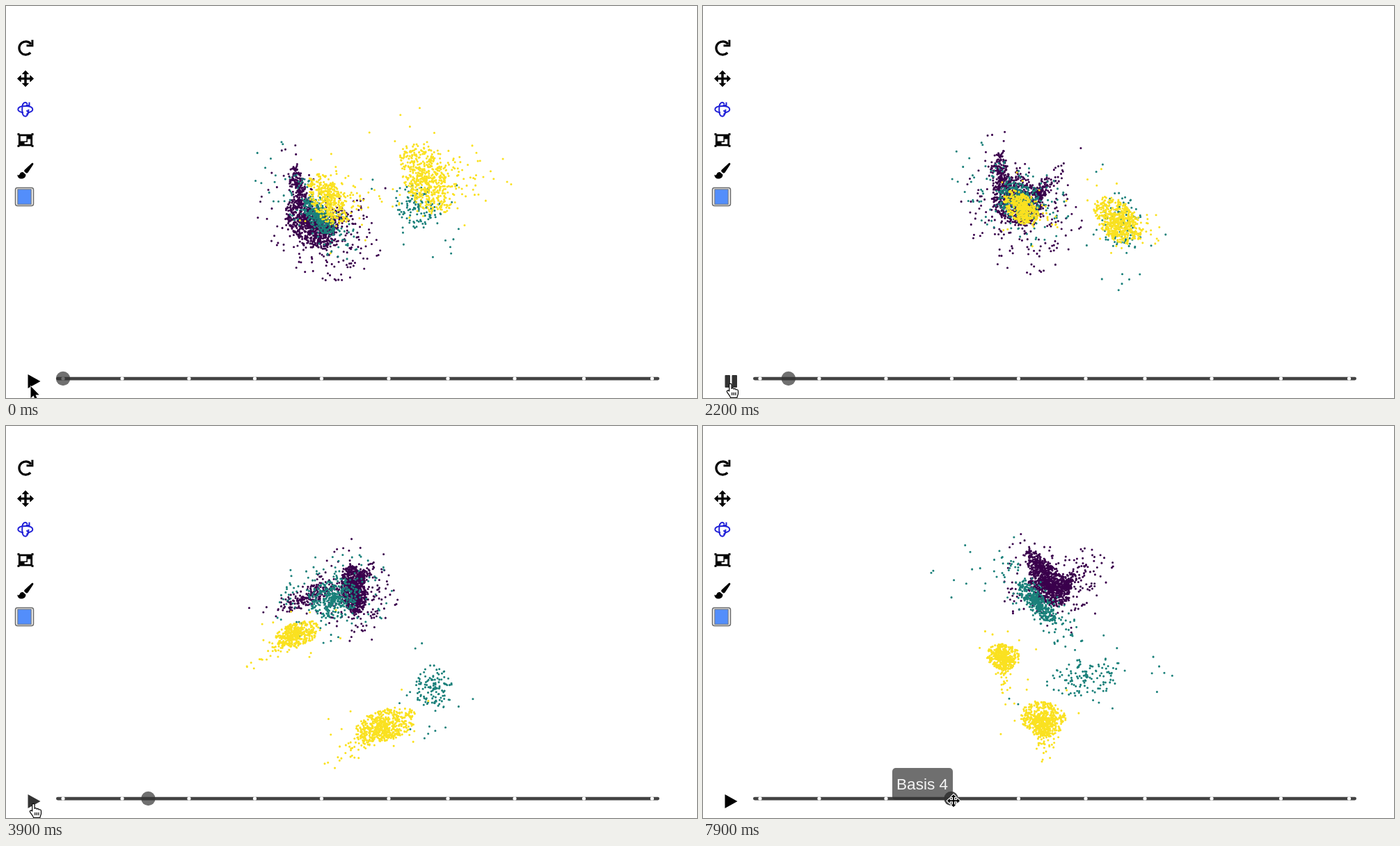
An HTML page with a canvas for the animation above (8000 ms loop, 993 by 564 pixels).

```html
<!DOCTYPE html>
<html lang="en">
<head>
<meta charset="utf-8">
<title>Projection player</title>
<style>
html, body { margin: 0; width: 100%; height: 100%; overflow: hidden; background: #fff; }
canvas, svg { position: absolute; left: 0; top: 0; width: 993px; height: 564px; display: block; }
text { font: 22.6px "Liberation Sans", Arial, sans-serif; }
</style>
</head>
<body>
<canvas id="plot" width="993" height="564"></canvas>
<svg viewBox="0 0 993 564">
  <defs>
    <path id="cross" d="M0-11.6L4.5-6.8H1.3V-1.3H6.8V-4.5L11.6 0L6.8 4.5V1.3H1.3V6.8H4.5L0 11.6L-4.5 6.8H-1.3V1.3H-6.8V4.5L-11.6 0L-6.8-4.5V-1.3H-1.3V-6.8H-4.5Z"/>
    <filter id="soft" x="-20%" y="-300%" width="140%" height="700%"><feGaussianBlur stdDeviation="2"/></filter>
  </defs>

  <path d="M35.2 67.2A9.5 9.5 0 1 1 36 54.8" fill="none" stroke="#000" stroke-width="3.2"/>
  <path d="M36.4 48.7H39.4V58.6H29.5V55.4L36.6 55.6Z"/>
  <use href="#cross" x="28" y="104.5" stroke="#000" stroke-width=".8" stroke-linejoin="round"/>
  <g fill="none" stroke="#2222d8" stroke-width="2">
    <path d="M25 153.4C19.5 152.6 17.3 151 17.3 148.8C17.3 145.6 22 144 27.8 144S38.3 145.6 38.3 148.8C38.3 151 36 152.6 31.5 153.3"/>
    <path d="M30.8 141.5C30 139.8 29 138.8 27.8 138.8C25 138.8 23.2 143 23.2 148.8S25 158.8 27.8 158.8C30.6 158.8 32.4 154.5 32.4 148.8"/>
    <path d="M33.5 138.5V143H28.6M29.5 150.3L32.8 153.3L29.5 156.3"/>
  </g>
  <path d="M16.5 183H19.4V184.4H36.6V183H39.5V185.9H38.1V200.1H39.5V203H36.6V201.6H19.4V203H16.5V200.1H17.9V185.9H16.5ZM20.8 187.3V194.5H29.4V187.3ZM30.9 191.6V195.9H26.6V198.8H35.2V191.6Z" fill-rule="evenodd"/>
  <path d="M37.2 226C38.8 225 40 226.6 39 228.2L31.8 239.2C30.8 240.6 29.6 241 28.4 240L26.8 238.6C25.8 237.6 26 236.6 27 235.6Z"/>
  <path d="M24.4 239L28.4 242.6C28.6 246.4 26 248.6 22.4 248.6C18.6 248.6 16.6 246.4 16.3 242.8C18.6 244.2 19.2 243 20 241.2C20.8 239.4 22.4 238.6 24.4 239Z"/>
  <rect x="13.5" y="261.5" width="26" height="26" rx="3" fill="#f0f0f0" stroke="#6b6b6b" stroke-width="1.5"/>
  <rect x="16.8" y="263.8" width="19.4" height="21.5" fill="#538efb" stroke="#777"/>

  <path id="play" d="M31.5 530V550L49.5 540Z"/>
  <path id="pause" d="M32.5 532H38V548H32.5ZM42.5 532H48V548H42.5Z" fill="#333" stroke="#333" stroke-width="2" stroke-linejoin="round"/>
  <rect x="72" y="533.7" width="867" height="4.8" rx="2.4" fill="#434343"/>
  <g id="ticks" fill="#fff"></g>
  <circle id="knob" cy="536" r="10.2" fill="#333"/>
  <g id="tip">
    <rect x="272" y="492" width="87" height="46" rx="5" fill="#333" opacity=".7"/>
    <text x="278" y="523" fill="#f4f4f4">Basis 4</text>
  </g>
  <rect id="shade" x="46" y="563" width="94" height="4" opacity=".22" filter="url(#soft)"/>

  <g stroke="#fff" stroke-linejoin="round">
    <path id="arrow" d="M0 0V17.2L4 13.6L6.8 20.2L9.8 19L7 12.6H12.2Z" stroke-width="1.3" paint-order="stroke"/>
    <use id="move" href="#cross" stroke-width="3" paint-order="stroke" transform="translate(360 539.3) scale(.78)"/>
  </g>
  <g id="hand" fill="#fff" stroke="#000" stroke-width="1.2" stroke-linejoin="round">
    <path d="M-1.8 10.5V1.2C-1.8-.6 1.4-.6 1.6 1.2V7C2.2 5.8 4.4 6 4.7 7.6C5.6 6.6 7.5 7 7.8 8.6C9 7.8 11 8.6 11 10.4V14C11 16 9.6 17 9.4 20H0C-.6 17-4.4 13.8-5.2 11.4C-5.2 9.2-3 9.2-1.8 10.5Z"/>
    <path d="M2.2 12.5V16.5M4.8 12.5V16.5M7.4 12.5V16.5" fill="none"/>
  </g>
</svg>
<script>
const LOOP = 8000, STEP = 100, START = 1400, STOP = 3800, JUMP = 7700;
const PURPLE = '#3a004c', TEAL = '#1a807a', YELLOW = '#fae120';
const $ = id => document.getElementById(id);
const ctx = $('plot').getContext('2d');

let seed = 20177;
const rnd = () => {
  seed = (seed + 0x6D2B79F5) | 0;
  let x = Math.imul(seed ^ seed >>> 15, 1 | seed);
  x ^= x + Math.imul(x ^ x >>> 7, 61 | x);
  return ((x ^ x >>> 14) >>> 0) / 4294967296;
};

// Point layouts in a cloud's own axes: a dense disc with some strays, and a one-sided tail.
const disc = stray => () => {
  const r = 2.2 * rnd() ** .7 * (rnd() < stray ? 2.3 : 1), a = 2 * Math.PI * rnd();
  return [r * Math.cos(a), r * Math.sin(a)];
};
const tail = () => [-Math.log(1 - rnd()), 2.6 * (rnd() + rnd() - 1)];

// Each pose is [x, y, length, angle, width]: start, middle and end of play, then after the jump.
const clouds = [];
const add = (color, n, layout, ...poses) =>
  clouds.push({ color, poses, points: Array.from({ length: n }, layout) });

add(PURPLE, 200, disc(.1),
  [420, 262, 15, 76, 5], [427, 243, 15, 84, 6], [432, 246, 21, 157, 6], [482, 199, 12, 45, 6]);
add(PURPLE, 720, disc(.06),
  [438, 313, 20, 46, 12], [452, 280, 18, 48, 15], [500, 236, 16, 82, 8], [498, 229, 16, 48, 11]);
add(PURPLE, 120, tail,
  [460, 318, 17, -34, 5], [478, 275, 16, -48, 4], [506, 224, 9, -48, 3], [517, 233, 12, -42, 4]);
add(PURPLE, 150, disc(0),
  [463, 338, 35, 10, 26], [464, 308, 37, 0, 36], [500, 244, 29, 5, 24], [512, 227, 38, -22, 20]);
add(TEAL, 430, disc(.3),
  [450, 303, 15, 52, 7], [454, 281, 15, 35, 12], [472, 248, 17, -15, 13], [480, 254, 18, 48, 6]);
add(TEAL, 16, disc(0),
  [388, 245, 38, 80, 15], [388, 245, 38, 85, 15], [428, 228, 38, 140, 14], [388, 205, 46, -25, 18]);
add(TEAL, 130, disc(.12),
  [592, 288, 17, 40, 13], [602, 312, 20, 80, 13], [615, 377, 15, 85, 12], [550, 361, 26, -10, 12]);

// Both yellow groups share one shape and differ in size and place.
const CORE = [[26, 62, 13], [19, 46, 11], [21, -17, 10], [15, 10, 11]];
const TAIL = [[32, -3, 22], [17, 20, 11], [27, 145, 8], [16, 88, 7]];
function yellow(n, scale, ...centers) {
  const place = shape => shape.map(([l, a, w], k) => [...centers[k], l * scale, a, w * scale]);
  add(YELLOW, n * .75, disc(.05), ...place(CORE));
  add(YELLOW, n * .25, tail, ...place(TAIL));
}
yellow(440, .75, [461, 280], [457, 291], [420, 299], [432, 332]);
yellow(600, 1, [602, 250], [595, 309], [546, 430], [489, 421]);

// Weights of the four poses: a parabola through the first three while playing.
function weights(u, jumped) {
  const m = 1 / 3;
  return jumped ? [0, 0, 0, 1]
    : [(u - m) * (u - 1) / m, u * (u - 1) / (m * (m - 1)), u * (u - m) / (1 - m), 0];
}

function drawPlot(w) {
  ctx.clearRect(0, 0, 993, 564);
  for (const { color, poses, points } of clouds) {
    const [x, y, length, angle, width] =
      poses[0].map((_, c) => poses.reduce((sum, pose, k) => sum + w[k] * pose[c], 0));
    const cos = Math.cos(angle * Math.PI / 180), sin = Math.sin(angle * Math.PI / 180);
    ctx.fillStyle = color;
    ctx.beginPath();
    for (const [a, b] of points) {
      const px = x + a * length * cos - b * width * sin;
      const py = y + a * length * sin + b * width * cos;
      ctx.moveTo(px + 1.55, py);
      ctx.arc(px, py, 1.55, 0, 7);
    }
    ctx.fill();
  }
}

// The pointer rests on the button, then sweeps past the fourth tick and settles back on it.
const ramp = (t, a, b) => Math.min(Math.max((t - a) / (b - a), 0), 1);
const pointerAt = t => [
  35.5 + 4 * ramp(t, 0, 300) + 356 * ramp(t, 4200, 4900) - 35 * ramp(t, 4900, 5100),
  547 - 3.5 * ramp(t, 0, 300) - 6 * ramp(t, 4200, 5500)
];

const show = (id, on) => $(id).setAttribute('display', on ? 'inline' : 'none');

function render(t) {
  const u = ramp(t, START, STOP), jumped = t >= JUMP;
  const playing = t >= START && t < STOP, hover = t >= 200 && t < 4300;
  drawPlot(weights(u, jumped));
  $('knob').setAttribute('cx', jumped ? 356.5 : 82 + 122.4 * u);
  $('knob').setAttribute('opacity', jumped ? .9 : .7);
  $('play').setAttribute('fill', hover ? '#333' : '#000');
  show('play', !playing);
  show('pause', playing);
  show('tip', jumped);
  show('shade', t >= 2700 && t < 3100);
  show('hand', hover);
  show('arrow', !hover && !jumped);
  show('move', jumped);
  for (const id of ['hand', 'arrow']) $(id).setAttribute('transform', `translate(${pointerAt(t)})`);
}

$('ticks').innerHTML = [82, 167, 263, 357.5, 453.5, 550, 635, 731, 830.5, 928.5]
  .map(x => `<circle cx="${x}" cy="536" r="2.6"/>`).join('');

const begin = performance.now();
let last = -1;
function frame() {
  const t = Math.floor((performance.now() - begin) % LOOP / STEP) * STEP;
  if (t !== last) render(last = t);
  requestAnimationFrame(frame);
}
frame();
</script>
</body>
</html>
```
